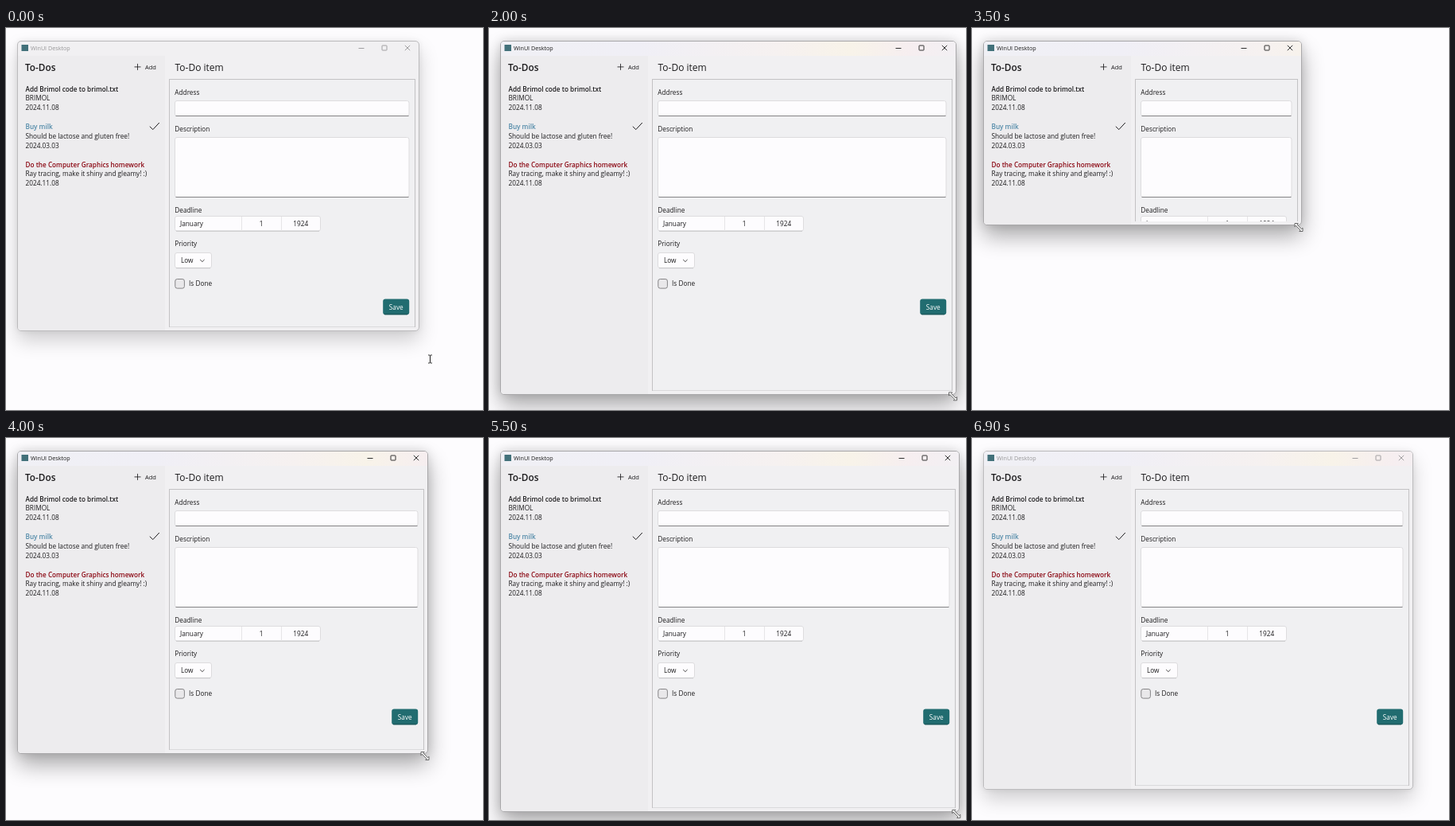
Recreate the animation shown at these times as an HTML page. Size 600x480 px, loop 7 s.

```html
<!DOCTYPE html>
<html lang="en">
<head>
<meta charset="utf-8">
<title>Resizing a to-do window</title>
<style>
  html, body { margin: 0; width: 100%; height: 100%; overflow: hidden; background: #fdfcfe; }
  #stage { position: relative; width: 600px; height: 480px; overflow: hidden; }

  /* --r and --b are the right and bottom edges; --pr and --pb those the content is laid out for */
  #window {
    position: absolute; left: 14px; top: 16px; box-sizing: border-box; overflow: hidden;
    width: calc(var(--r) * 1px - 14px);
    height: calc(var(--b) * 1px - 16px);
    border: 1px solid #bcbbbd; border-radius: 5px; background: #f1f0f2;
    box-shadow: 0 12px 24px rgba(0, 0, 0, .18), 0 0 7px rgba(0, 0, 0, .07);
    --caption: #979698;
  }
  #window.active {
    --caption: #1b1b1b;
    border-color: #a9a8aa;
    box-shadow: 0 14px 28px rgba(0, 0, 0, .32), 0 0 13px rgba(0, 0, 0, .13);
  }
  #window > svg { position: absolute; left: -15px; top: -17px; }
  svg { display: block; }

  text { font: 8.25px "Open Sans", "Noto Sans", sans-serif; fill: #1d1c1e; white-space: pre; }
  .bold { font-weight: 600; font-size: 8.2px; }
  .head { font-size: 12px; }
  .head.bold { font-size: 11.8px; }
  .small { font-size: 7.5px; }
  .mid { text-anchor: middle; }
  .late { fill: #8b0712; }
  .done { fill: #5089a8; }

  #title { font-size: 7.2px; fill: var(--caption); }
  #buttons { transform: translateX(calc(var(--r) * 1px)); fill: none; stroke: var(--caption); stroke-width: .9; }
  #tint { opacity: 0; }
  .tinted #tint { opacity: 1; }

  #viewport { height: calc(var(--pb) * 1px - 5px); }
  #panel {
    fill: #f0f0f2; stroke: #c3c2c4;
    width: calc(var(--pr) * 1px - 211px);
    height: calc(max(var(--pb) - 5, 367) * 1px - 64.5px);
  }
  .box { fill: #fdfcfe; stroke: #dddcde; }
  .field { width: calc(var(--pr) * 1px - 225.5px); }
  .base { height: 1px; fill: #858486; width: calc(var(--pr) * 1px - 227px); }
  #save { transform: translateX(calc(var(--pr) * 1px)); }
  .line { fill: none; stroke: #1d1c1e; }
  #pointers { position: absolute; left: 0; top: 0; }
</style>
</head>
<body>
<div id="stage">
  <div id="window">
    <svg width="600" height="480">
      <defs>
        <linearGradient id="wall" gradientUnits="userSpaceOnUse" x1="14" y1="0" x2="600" y2="0">
          <stop offset="0" stop-color="#f0f0f5"/>
          <stop offset=".3" stop-color="#f0eff6"/>
          <stop offset=".6" stop-color="#f6f1f0"/>
          <stop offset=".75" stop-color="#f8f3e9"/>
          <stop offset=".88" stop-color="#f6eef0"/>
          <stop offset="1" stop-color="#f2f0f4"/>
        </linearGradient>
        <clipPath id="view"><rect id="viewport" width="600"/></clipPath>
      </defs>
      <rect id="tint" x="14" y="16" width="586" height="19" fill="url(#wall)"/>
      <rect x="14" y="35" width="186" height="445" fill="#edecee"/>
      <rect x="19.5" y="21" width="8.5" height="8" fill="#42717a"/>
      <text id="title" x="31" y="27.9">WinUI Desktop</text>
      <g id="buttons">
        <path d="M-76.5 25.5h7"/>
        <rect x="-47" y="22" width="6" height="6" rx=".6"/>
        <path d="M-18.2 21.8l6.4 6.4m0-6.4l-6.4 6.4"/>
      </g>

      <text class="head bold" x="24" y="54">To-Dos</text>
      <path class="line" d="M161.5 48.9h8M165.5 44.9v8" stroke-width=".85"/>
      <text class="small" x="175" y="52">Add</text>

      <text class="bold" x="24.5" y="79.6">Add Brimol code to brimol.txt</text>
      <text x="24.5" y="91.3">BRIMOL</text>
      <text x="24.5" y="103">2024.11.08</text>

      <text class="bold done" x="24.5" y="127">Buy milk</text>
      <text x="24.5" y="139">Should be lactose and gluten free!</text>
      <text x="24.5" y="150.7">2024.03.03</text>
      <path class="line" d="M180.8 123.7l4 3.9 8-8.6"/>

      <text class="bold late" x="24.5" y="174.5">Do the Computer Graphics homework</text>
      <text x="24.5" y="186.3">Ray tracing, make it shiny and gleamy! :)</text>
      <text x="24.5" y="198">2024.11.08</text>

      <text class="head" x="212.5" y="54">To-Do item</text>

      <g clip-path="url(#view)">
        <rect id="panel" x="205.5" y="64.5"/>
        <text x="212.3" y="83.8">Address</text>
        <rect class="box field" x="212.5" y="91.5" height="19" rx="2.5"/>
        <rect class="base" x="213.5" y="110"/>

        <text x="212.3" y="129.8">Description</text>
        <rect class="box field" x="212.5" y="137.5" height="75" rx="2.5"/>
        <rect class="base" x="213.5" y="212"/>

        <text x="212.3" y="231.8">Deadline</text>
        <rect class="box" x="212.5" y="236.5" width="183" height="18.5" rx="2.5"/>
        <path d="M214 255.2h180" stroke="#c6c5c7"/>
        <path d="M296.5 237v18M346.5 237v18" stroke="#e6e5e7"/>
        <text x="219" y="248.6">January</text>
        <text class="mid" x="321" y="248.6">1</text>
        <text class="mid" x="370.8" y="248.6">1924</text>

        <text x="212.3" y="274.3">Priority</text>
        <rect class="box" x="212.5" y="282.5" width="46" height="19" rx="2.5"/>
        <path d="M214 301.7h43" stroke="#c6c5c7"/>
        <text x="220" y="295.2">Low</text>
        <path class="line" d="M244.2 291l2.7 2.7 2.7-2.7" stroke-width=".8"/>

        <rect x="212.8" y="315.5" width="11.6" height="11.6" rx="2.5" fill="#e9e8ea" stroke="#858486"/>
        <text x="230" y="324.2">Is Done</text>

        <g id="save">
          <rect x="-45.8" y="340.5" width="33" height="19.8" rx="3" fill="#216c70"/>
          <path d="M-44 359.8h29" stroke="#174d50"/>
          <text class="mid" x="-29.3" y="353.5" style="fill:#fff">Save</text>
        </g>
      </g>
    </svg>
  </div>

  <svg id="pointers" width="600" height="480">
    <path id="beam" fill="none" stroke="#1b1b1b" stroke-width=".9"
      d="M-2.5-5h1.5q1 0 1 1v8q0 1-1 1h-1.5M2.5-5h-1.5q-1 0-1 1v8q0 1 1 1h1.5"/>
    <path id="sizer" fill="#fff" stroke="#444" stroke-width=".8"
      d="M-5-5h4.2l-1.4 1.4 5.8 5.8 1.4-1.4v4.2h-4.2l1.4-1.4-5.8-5.8-1.4 1.4z"/>
  </svg>
</div>

<script>
  const LOOP = 7000, STEP = 100;
  const PRESS = 600, RELEASE = 6900, NEAR = 500;

  // time, right edge, bottom edge
  const path = [
    [0, 520, 381], [800, 520, 381], [900, 523, 386], [1200, 539, 408],
    [1600, 566, 434], [2000, 588, 461], [2400, 579, 448], [2700, 540, 379],
    [3200, 410, 242], [3500, 415, 248], [4000, 531, 397], [4400, 570, 444],
    [4800, 586, 463], [5200, 592, 470], [5500, 592, 470], [5700, 590, 468],
    [6000, 552, 424], [6200, 512, 374], [6400, 507, 374], [6899, 507, 374],
    [6900, 555, 442], [7000, 555, 442]
  ];

  const $ = id => document.getElementById(id);
  const mix = (a, b, k) => a + (b - a) * k;

  function corner(t) {
    const i = Math.max(1, path.findIndex(p => p[0] >= t));
    const a = path[i - 1], b = path[i];
    const k = Math.max(0, (t - a[0]) / (b[0] - a[0]));
    return [mix(a[1], b[1], k), mix(a[2], b[2], k)];
  }

  function place(el, x, y, shown) {
    el.setAttribute('transform', `translate(${x} ${y})`);
    el.style.display = shown ? '' : 'none';
  }

  function render(t) {
    const now = corner(t);
    const dragging = t >= PRESS && t < RELEASE;
    // When shrinking, the content trails the frame and the pointer leads it.
    const before = dragging ? corner(t - 30) : now;
    const after = dragging ? corner(t + 20) : now;
    const win = $('window');
    const [r, b] = now.map(Math.round);
    const vars = {
      r, b,
      pr: Math.max(r, Math.round(before[0])),
      pb: Math.max(b, Math.round(before[1]))
    };
    for (const name in vars) win.style.setProperty('--' + name, vars[name]);
    win.classList.toggle('active', dragging);
    win.classList.toggle('tinted', t >= PRESS);

    const x = Math.min(now[0], after[0]) - 4;
    const y = Math.min(now[1], after[1]) + 2.5;
    const k = Math.min(1, t / NEAR);
    place($('beam'), mix(533.5, x, k), mix(416, y, k), t < NEAR);
    place($('sizer'), x, y, t >= NEAR && t < RELEASE);
  }

  const start = performance.now();
  function tick() {
    const t = (performance.now() - start) % LOOP;
    render(Math.floor(t / STEP) * STEP);
    requestAnimationFrame(tick);
  }
  tick();
</script>
</body>
</html>
```
